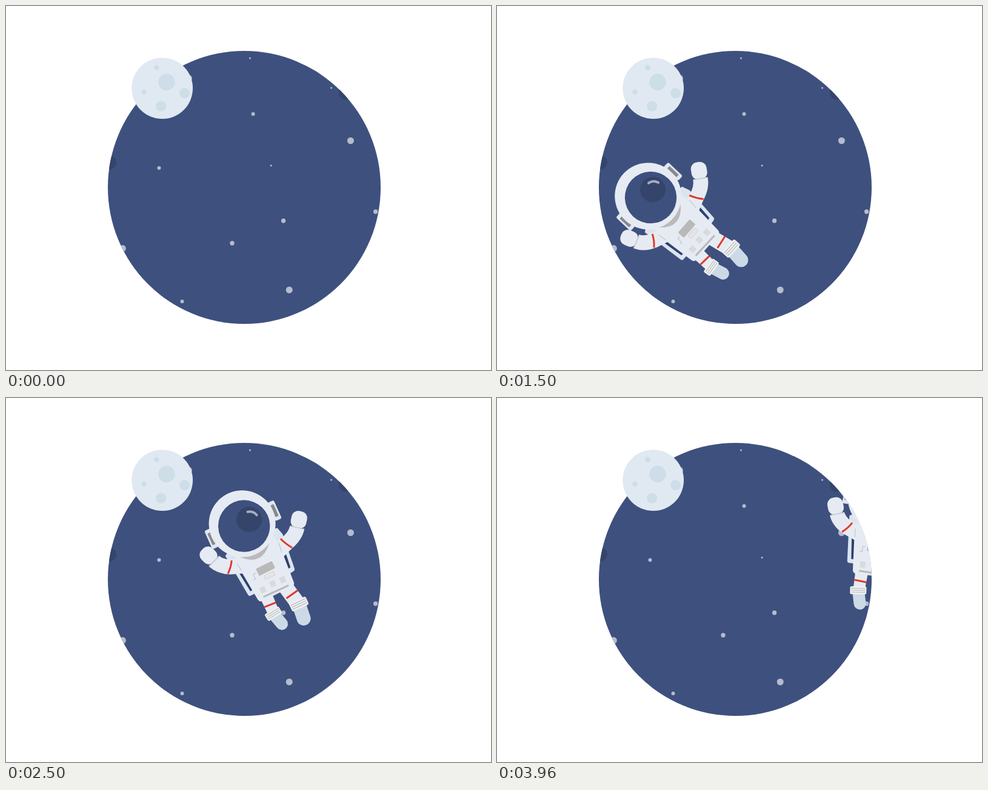
These frames come from a looping animation (800x600 px, 4 s). An HTML page:

```html
<!DOCTYPE html>
<html lang="en">
<head>
<meta charset="utf-8">
<title>Drifting astronaut</title>
<style>
  html, body { margin: 0; width: 100%; height: 100%; overflow: hidden; background: #fff; }
  svg { display: block; width: 800px; height: 600px; }
</style>
</head>
<body>
<svg viewBox="0 0 800 600" fill="none">
  <defs>
    <circle id="sky" cx="393" cy="299" r="225"/>
    <clipPath id="disc"><use href="#sky"/></clipPath>
    <g id="ear">
      <rect x="-5.7" y="-16.5" width="11.4" height="33" rx="3" fill="#dfe7f0"/>
      <rect x="-2.8" y="-10.5" width="5.6" height="21" rx="1" fill="#888a8d"/>
    </g>
    <g id="cuff">
      <rect x="-15" y="-7.3" width="30" height="14.6" rx="3" fill="#eff0f2"/>
      <path d="M-13-3.6H13M-13 0H13M-13 3.6H13" stroke="#bdbdbd" stroke-width="1.3"/>
    </g>
    <g id="glove">
      <rect x="-13" y="-27.5" width="26" height="28.5" rx="11" fill="#e6ebf3"/>
      <path d="M-12 0H12" stroke="#c3c7cd" stroke-width="1.5"/>
    </g>
  </defs>

  <use href="#sky" fill="#3e507e"/>
  <g clip-path="url(#disc)">
    <!-- dark spots, then stars grouped by size -->
    <g stroke-linecap="round">
      <path d="M170.5 258h0M560 143h0" stroke="#35446b" stroke-width="23"/>
      <g stroke="#b5bccd">
        <path d="M402.5 86h0M536.5 135h0M437.2 263h0" stroke-width="3.2"/>
        <path d="M407.6 178h0M252.5 267h0M290.5 487h0" stroke-width="6"/>
        <path d="M457.6 354h0M609.6 339h0M373 391h0" stroke-width="7.3"/>
        <path d="M568.4 222h0M192.4 399.6h0M467.2 468h0" stroke-width="11"/>
      </g>
    </g>

    <g id="astronaut">
      <!-- backpack -->
      <path d="M-40 33L-47 37-39 111q.5 3 3.5 3L0 113 45 106q3.5-.5 3.7-3.5L54 43 50 30 44 29Z" fill="#dbe5ef"/>
      <path d="M-38.5 66H-20V107H-33ZM30 66H46.5L43.5 98 30 101Z" fill="#2e4170"/>

      <!-- legs -->
      <g stroke="#cbdae6" stroke-linecap="round">
        <path d="M-13 158L-7.5 177.5" stroke-width="20"/>
        <path d="M31 162L29 184" stroke-width="23"/>
      </g>
      <path d="M-23 124H-2L-3 156H-22ZM10 124L35 121 42 153 17 156Z" fill="#e6ebf3"/>
      <use href="#cuff" transform="translate(-13.5 156.4) rotate(-8) scale(.9)"/>
      <use href="#cuff" transform="translate(31.5 159) rotate(-1)"/>

      <!-- arms -->
      <g stroke="#e6ebf3" stroke-width="24.5">
        <path d="M80.2 42.7Q72 54.5 53 59.5L36 66"/>
        <path d="M-67.5 37.5Q-62 50-47 57L-28 64"/>
      </g>
      <use href="#glove" transform="translate(80.2 42.7) rotate(37)"/>
      <use href="#glove" transform="translate(-67.5 37.5) rotate(-20)"/>

      <!-- torso -->
      <path d="M-32 44L-34 66-27.5 125Q-26.5 130-21 130L33 128Q38.5 127.5 38.5 122L41.5 66 40 40Z" fill="#e6ebf3"/>
      <path d="M47.7 48.4Q52 60 59.2 69.7M-40.5 48Q-46 58-55 65.5M-22.5 140.3L-2.2 141.2M16.5 142L39 137.6"
            stroke="#e2392b" stroke-width="3"/>
      <path d="M42.2 53.7L40.4 70.3M-34.3 56.6L-32.6 70.4M-21 92.5H-17.2V83.8L-12.3 83.2"
            stroke="#c6c9cf" stroke-width="1.4"/>
      <path d="M-27 47Q1 79 28 47Z" fill="#bababa"/>
      <g transform="rotate(-2 5 83)">
        <rect x="-9.7" y="76.5" width="29.5" height="13" rx="2" fill="#b9b9b9"/>
        <rect x="-3" y="92.7" width="18" height="7" rx="1.5" fill="#e5e5e7" stroke="#d2d2d4"/>
      </g>
      <path d="M-17.5 113.4h9M1.1 111h9M18.9 111.4h9" stroke="#d9dadc" stroke-width="10"/>
      <path d="M-16 124.5L27.2 124" stroke="#b9b9b9" stroke-width="3" stroke-linecap="round"/>

      <!-- helmet -->
      <use href="#ear" x="-56.3" y="2"/>
      <use href="#ear" x="57.6" y="2"/>
      <circle r="55" fill="#e6ebf3"/>
      <circle cx="1.3" cy="4.7" r="42.7" fill="#3e507e"/>
      <circle cx="13.3" cy="-1.9" r="21" fill="#35446b"/>
      <path d="M16.2-14.2Q25-12.5 27.8-3.2" stroke="#a4aec3" stroke-width="4" stroke-linecap="round"/>
    </g>
  </g>

  <!-- moon -->
  <circle cx="301" cy="119.5" r="6" fill="#b5bccd"/>
  <circle cx="257.7" cy="135.6" r="50.4" fill="#e0e9f1"/>
  <g stroke="#cddee8" stroke-linecap="round">
    <path d="M265 125.5h0" stroke-width="27.6"/>
    <path d="M294.6 143.5h0M255.7 165.2h0" stroke-width="17.3"/>
    <path d="M248.5 101.7h0M227.5 141.6h0" stroke-width="8.8"/>
  </g>
</svg>

<script>
const LOOP = 4000, FPS = 30;
const astronaut = document.getElementById('astronaut');

function draw() {
  const t = Math.floor((performance.now() % LOOP) * FPS / 1000 + .25) / FPS;

  // The waist climbs almost straight at first, then the path bends over to the right.
  const u = t - 1.05;
  const x = 301.2 + 94 * u + 3.5 * u ** 3 - .59 * u ** 4;
  const y = 432.2 - 82 * u + 1.325 * u ** 4;

  // A steady quarter turn per loop, around the waist.
  const tilt = -80.3 + 90 * t / 4;

  astronaut.setAttribute('transform', `translate(${x} ${y}) rotate(${tilt}) translate(-5.5 -125)`);
  requestAnimationFrame(draw);
}
draw();
</script>
</body>
</html>
```
